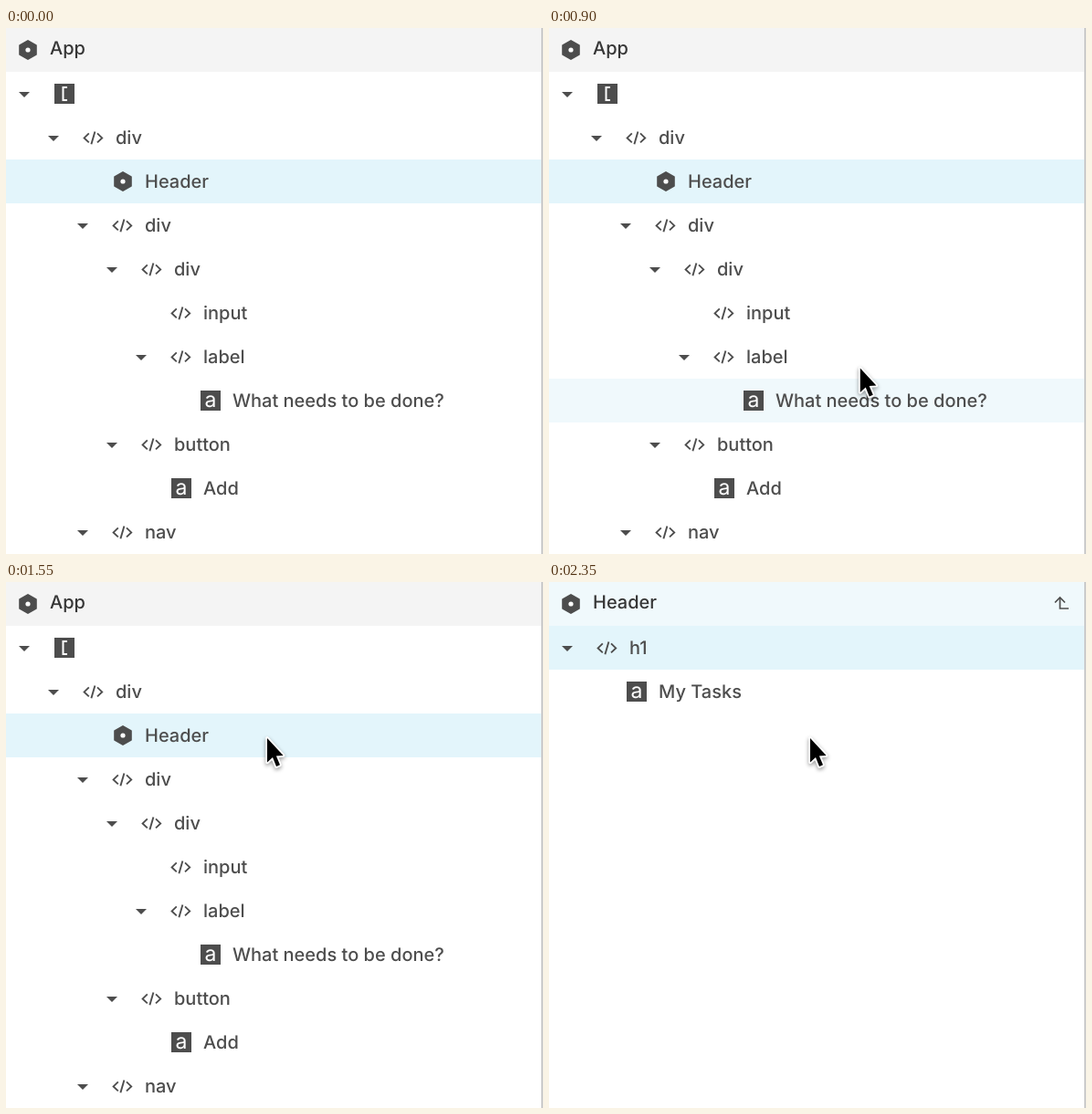
Write an HTML page with a canvas that moves like this. It is 588x576 px and loops after 3.49 s.

```html
<!DOCTYPE html>
<html lang="en">
<head>
<meta charset="utf-8">
<title>Component tree</title>
<style>
  html, body { margin: 0; width: 100%; height: 100%; overflow: hidden; background: #fff; }
  canvas { display: block; width: 588px; height: 576px; }
</style>
</head>
<body>
<canvas id="stage" width="588" height="576"></canvas>
<script>
const ctx = document.getElementById('stage').getContext('2d');
const W = 588, H = 576, ROW = 48, LOOP = 3490, STEP = 50;
const INK = '#4d4d4d', SELECTED = '#e3f5fb', HOVER = '#f0f9fc';
const MOVE_START = 700, MOVE_END = 1300, CLICK = 2050, CLICK_END = 2300, OPEN = 2350;

// Each row: depth, icon, label, has a toggle
const appTree = {
  title: 'App', bar: '#f4f4f4', selected: 2,
  rows: [
    [0, 'list', '', true],
    [1, 'tag', 'div', true],
    [2, 'component', 'Header', false],
    [2, 'tag', 'div', true],
    [3, 'tag', 'div', true],
    [4, 'tag', 'input', false],
    [4, 'tag', 'label', true],
    [5, 'text', 'What needs to be done?', false],
    [3, 'tag', 'button', true],
    [4, 'text', 'Add', false],
    [2, 'tag', 'nav', true]
  ]
};
const headerTree = {
  title: 'Header', bar: HOVER, selected: 0, back: true,
  rows: [
    [0, 'tag', 'h1', true],
    [1, 'text', 'My Tasks', false]
  ]
};

function rect(x, y, w, h, color) {
  ctx.fillStyle = color;
  ctx.fillRect(x, y, w, h);
}

function trace(points, closed) {
  ctx.beginPath();
  points.forEach(([x, y]) => ctx.lineTo(x, y));
  if (closed) ctx.closePath();
}

function line(points, color, width) {
  trace(points);
  ctx.strokeStyle = color;
  ctx.lineWidth = width;
  ctx.stroke();
}

// Half-size type on a doubled scale, as on a 2x display
function type(text, x, y, size, color, weight = 500, align = 'left') {
  ctx.save();
  ctx.scale(2, 2);
  ctx.font = `${weight} ${size / 2}px Inter, sans-serif`;
  ctx.textRendering = 'geometricPrecision';
  ctx.textAlign = align;
  ctx.fillStyle = color;
  ctx.fillText(text, x / 2, y / 2);
  ctx.restore();
}

const icons = {
  component(x, y) {
    const corners = [[0, -10], [8.8, -5], [8.8, 5], [0, 10], [-8.8, 5], [-8.8, -5]];
    trace(corners.map(([a, b]) => [x + a, y + b]), true);
    ctx.fillStyle = ctx.strokeStyle = INK;
    ctx.lineWidth = 2;
    ctx.lineJoin = 'round';
    ctx.fill();
    ctx.stroke();
    ctx.lineJoin = 'miter';
    ctx.beginPath();
    ctx.arc(x, y, 2.6, 0, Math.PI * 2);
    ctx.fillStyle = '#fff';
    ctx.fill();
  },
  tag(x, y) {
    for (const s of [-1, 1]) {
      line([[x - 0.6 + s * 4.6, y - 4.6], [x - 0.6 + s * 9.8, y + 0.4], [x - 0.6 + s * 4.6, y + 5.4]], INK, 1.9);
    }
    line([[x + 1.4, y - 6.5], [x - 2.6, y + 7.3]], INK, 1.9);
  },
  text(x, y) {
    rect(x - 11, y - 11, 22, 22, INK);
    type('a', x, y + 6.5, 23, '#fff', 400, 'center');
  },
  list(x, y) {
    rect(x - 11, y - 11, 22, 22, INK);
    line([[x + 3, y - 7], [x - 1.5, y - 7], [x - 1.5, y + 7], [x + 3, y + 7]], '#fff', 2);
  }
};

function toggle(x, y) {
  trace([[x - 6, y - 2], [x + 6, y - 2], [x, y + 4]], true);
  ctx.fillStyle = INK;
  ctx.fill();
}

function drawTree(tree, hovered) {
  rect(0, 0, W, H, '#fff');
  rect(0, 0, W, ROW, tree.bar);
  icons.component(24, 24);
  type(tree.title, 48, 29, 20, '#363636');
  if (tree.back) {
    line([[554, 22.5], [559.5, 17], [565, 22.5]], INK, 1.7);
    line([[559.5, 17.5], [559.5, 29], [569, 29]], INK, 1.7);
  }
  tree.rows.forEach(([depth, icon, label, open], i) => {
    const top = ROW * (i + 1), mid = top + ROW / 2, x = 88 + depth * 32;
    if (i === tree.selected) rect(0, top, W, ROW, SELECTED);
    else if (i === hovered) rect(0, top, W, ROW, HOVER);
    if (open) toggle(x - 68, mid);
    icons[icon](x - 24, mid);
    type(label, x, mid + 7, 20, INK);
  });
  rect(586, 0, 2, H, '#cbcbcb');
}

function pointerAt(t) {
  const u = Math.max(0, Math.min(1, (MOVE_END - t) / (MOVE_END - MOVE_START)));
  return {
    x: 286 + 112 * u * u * (1.3 - 0.3 * u),
    y: 171 + 382 * u * u * (1.56 - 0.56 * u)
  };
}

function drawPointer({ x, y }) {
  const arrow = [[0, 0], [0, 26.5], [6, 21], [10, 31], [14, 29.3], [9.9, 19.6], [17.6, 19]];
  trace(arrow.map(([a, b]) => [x + a, y + b]), true);
  ctx.save();
  ctx.shadowColor = 'rgba(0,0,0,.4)';
  ctx.shadowBlur = 4;
  ctx.shadowOffsetY = 2;
  ctx.strokeStyle = '#fff';
  ctx.lineWidth = 3.6;
  ctx.lineJoin = 'round';
  ctx.stroke();
  ctx.restore();
  ctx.fillStyle = '#000';
  ctx.fill();
}

function drawClick(t) {
  if (t < CLICK || t >= CLICK_END) return;
  const shrink = Math.floor((t - CLICK) / 100) * 0.38;
  ctx.beginPath();
  ctx.arc(285, 172, 42.7 * (1 - shrink), 0, Math.PI * 2);
  ctx.strokeStyle = '#000';
  ctx.lineWidth = 3;
  ctx.stroke();
}

// The hover highlight trails the pointer by one step
function hoveredRow(t) {
  return t > MOVE_START ? Math.floor(pointerAt(t - STEP).y / ROW) - 1 : -1;
}

function render(now) {
  const t = Math.floor((now % LOOP) / STEP) * STEP;
  if (t < OPEN) drawTree(appTree, hoveredRow(t));
  else drawTree(headerTree, -1);
  if (t >= MOVE_START) drawPointer(pointerAt(t));
  drawClick(t);
}

const start = performance.now();
function tick() {
  render(performance.now() - start);
  requestAnimationFrame(tick);
}
tick();
</script>
</body>
</html>
```
